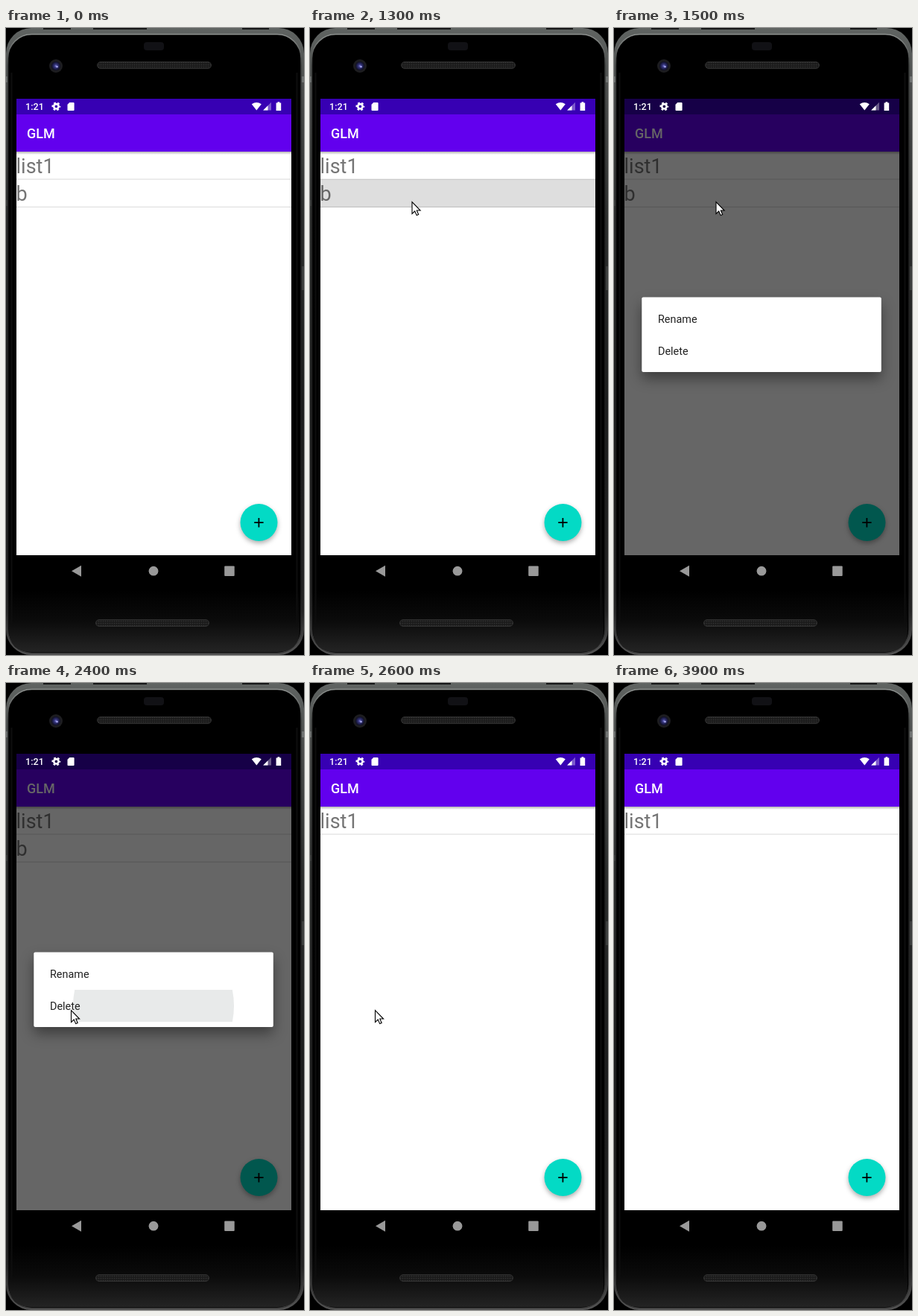
These frames come from a looping animation (400 by 842 pixels, 4 s). An HTML page:

```html
<!DOCTYPE html>
<html lang="en">
<head>
<meta charset="utf-8">
<title>List app</title>
<style>
  html, body { margin: 0; width: 100%; height: 100%; overflow: hidden; background: #000; }
  svg { display: block; width: 100vw; height: 100vh; }
  text { font-family: Roboto, sans-serif; }
  #fab { filter: drop-shadow(0 3px 3px rgba(0,0,0,.32)); }
  #panel { filter: drop-shadow(0 9px 9px rgba(0,0,0,.4)); }
</style>
</head>
<body>
<svg viewBox="0 0 400 842" xmlns="http://www.w3.org/2000/svg">
  <defs>
    <linearGradient id="rim" x1="0" y1="0" x2="0" y2="1">
      <stop offset="0" stop-color="#606462"/>
      <stop offset=".1" stop-color="#4a4c4b"/>
      <stop offset=".3" stop-color="#2c2e2d"/>
      <stop offset=".6" stop-color="#1c1d1d"/>
      <stop offset=".93" stop-color="#242424"/>
      <stop offset="1" stop-color="#555"/>
    </linearGradient>
    <linearGradient id="edge" x1="0" y1="0" x2="0" y2="1">
      <stop offset="0" stop-color="#8d918f"/>
      <stop offset=".05" stop-color="#3a3c3b"/>
      <stop offset=".3" stop-color="#222"/>
      <stop offset=".9" stop-color="#1c1c1c"/>
      <stop offset="1" stop-color="#3c3c3c"/>
    </linearGradient>
    <linearGradient id="chin" x1="0" y1="0" x2="0" y2="1">
      <stop offset="0" stop-color="#000"/>
      <stop offset=".5" stop-color="#0b0b0b"/>
      <stop offset="1" stop-color="#242424"/>
    </linearGradient>
    <linearGradient id="barShade" x1="0" y1="0" x2="0" y2="1">
      <stop offset="0" stop-color="#000" stop-opacity=".3"/>
      <stop offset="1" stop-color="#000" stop-opacity="0"/>
    </linearGradient>
    <radialGradient id="lens">
      <stop offset="0" stop-color="#7f7fd8"/>
      <stop offset=".35" stop-color="#35357c"/>
      <stop offset="1" stop-color="#0c0c20"/>
    </radialGradient>
    <pattern id="mesh" width="3" height="3" patternUnits="userSpaceOnUse">
      <rect width="3" height="3" fill="#1b1b1b"/>
      <circle cx="1.5" cy="1.5" r=".8" fill="#343434"/>
    </pattern>
    <clipPath id="rowClip"><rect x="14" y="203" width="369" height="38"/></clipPath>
    <clipPath id="itemClip"><rect x="37" y="412" width="322" height="43"/></clipPath>
  </defs>

  <!-- phone body -->
  <rect width="400" height="842" fill="#000"/>
  <rect x="0" y="0" width="400" height="842" rx="34" fill="url(#rim)"/>
  <g fill="#151616">
    <rect x="50" width="37" height="2"/>
    <rect x="117" width="72" height="2"/>
    <rect x="317" width="36" height="2"/>
  </g>
  <g fill="#707372">
    <rect x="0" y="65" width="3" height="8"/>
    <rect x="397" y="65" width="3" height="8"/>
    <rect x="0" y="231" width="3" height="8" fill="#3c3e3d"/>
    <rect x="397" y="320" width="3" height="32" fill="#3c3e3d"/>
  </g>
  <rect x="2.5" y="8.5" width="393.5" height="831" rx="32" fill="#000" stroke="url(#edge)" stroke-width="1.5"/>
  <path d="M4 755H394V808Q394 838 364 838H34Q4 838 4 808Z" fill="url(#chin)"/>
  <path d="M7.5 60V800M390.5 60V800" stroke="#0e0e0e" stroke-width="2"/>

  <rect x="185" y="19" width="27" height="11" rx="4" fill="#111115"/>
  <circle cx="67" cy="51" r="9" fill="#1d1d20"/>
  <circle cx="67" cy="51" r="6" fill="url(#lens)"/>
  <circle cx="68.5" cy="52" r="1.3" fill="#a9a9ee"/>
  <g fill="url(#mesh)" stroke="#303030">
    <rect x="122.5" y="45.5" width="153" height="9" rx="4.5"/>
    <rect x="120.5" y="794.5" width="152" height="9" rx="4.5"/>
  </g>

  <!-- app -->
  <rect x="14" y="95" width="369" height="613" fill="#fff"/>
  <rect x="14" y="95" width="369" height="21" fill="#3700b3"/>
  <rect x="14" y="116" width="369" height="50" fill="#6200ee"/>
  <rect x="14" y="166" width="369" height="4" fill="url(#barShade)"/>
  <text x="28" y="148" font-size="18" font-weight="500" fill="#fff">GLM</text>
  <g font-size="27" fill="#757575">
    <text x="13.5" y="195">list1</text>
    <rect x="14" y="202.5" width="369" height="1.2" fill="#e0e0e0"/>
    <g id="rowB">
      <text x="13.5" y="232">b</text>
      <rect x="14" y="239.8" width="369" height="1.2" fill="#e0e0e0"/>
    </g>
  </g>
  <g clip-path="url(#rowClip)"><circle id="press" fill="#000"/></g>
  <g id="fab">
    <circle cx="339.5" cy="664" r="25" fill="#03dac5"/>
    <path d="M333.2 664.2H345.6M339.4 658V670.4" stroke="#000" stroke-width="1.8"/>
  </g>
  <rect id="dim" x="14" y="95" width="369" height="613" fill="#000"/>

  <!-- status bar icons -->
  <g fill="#fff">
    <text x="26" y="110.2" font-size="12.6" font-weight="500">1:21</text>
    <circle cx="67.4" cy="105.3" r="3.2" fill="none" stroke="#fff" stroke-width="2.6"/>
    <circle cx="67.4" cy="105.3" r="5" fill="none" stroke="#fff" stroke-width="1.9" stroke-dasharray="2.7 2.536" stroke-dashoffset="1.35"/>
    <path d="M85.3 100H90.5Q91.6 100 91.6 101.1V109.9Q91.6 111 90.5 111H83.6Q82.5 111 82.5 109.9V102.8Z"/>
    <path d="M329.8 102.3Q336.3 97.6 342.8 102.3L336.3 110.5Z"/>
    <path d="M345.2 110.5L356 99.7V110.5Z" opacity=".35"/>
    <path d="M345.2 110.5L351.5 104.2V110.5Z"/>
    <path d="M362.6 100.6H364.5V99.3H367.3V100.6H369.2V111H362.6Z"/>
  </g>

  <!-- navigation -->
  <g fill="#999">
    <path d="M88 729.3L101 721.8V736.8Z"/>
    <circle cx="198" cy="729.2" r="6.4"/>
    <rect x="293.2" y="722.5" width="13.5" height="13.5" rx="1"/>
  </g>

  <g id="menu">
    <rect id="panel" x="37.3" y="361.5" width="321.5" height="100.5" rx="2" fill="#fff"/>
    <g clip-path="url(#itemClip)"><circle id="tap" cx="198" cy="433.5" r="108" fill="#e8eaea"/></g>
    <g font-size="14.4" fill="#212121">
      <text x="59" y="396">Rename</text>
      <text x="59" y="439">Delete</text>
    </g>
  </g>

  <path id="arrow" d="M.5 .5V16.5L4.2 13L6.7 18.6L9.2 17.5L6.8 12H11.6Z" fill="#fff" stroke="#000" stroke-width="1.1"/>
</svg>
<script>
const LOOP = 4000, STEP = 100;
const el = id => document.getElementById(id);
const rowB = el('rowB'), press = el('press'), dim = el('dim'), menu = el('menu'), tap = el('tap'), arrow = el('arrow');

const clamp = v => Math.min(1, Math.max(0, v));
const part = (t, a, b) => clamp((t - a) / (b - a));
const mix = (a, b, k) => a + (b - a) * k;
const smooth = k => k * k * (3 - 2 * k);
const set = (node, attrs) => { for (const k in attrs) node.setAttribute(k, attrs[k]); };
const show = (node, on) => set(node, { visibility: on ? 'visible' : 'hidden' });

// pointer stops: time, x, y
const entry = [[100, 388, 796], [200, 295, 620], [300, 194, 447], [400, 128, 318], [500, 122, 252], [600, 136.5, 233]];

function pointer(t) {
  if (t < 600) {
    const i = Math.max(0, Math.floor(t / 100) - 1);
    const [t0, x0, y0] = entry[i], [t1, x1, y1] = entry[i + 1];
    const k = part(t, t0, t1);
    return [mix(x0, x1, k), mix(y0, y1, k)];
  }
  if (t < 3000) {
    const k = smooth(part(t, 1500, 2200));
    return [mix(136.5, 87, k), mix(233, 439, k)];
  }
  const k = part(t, 3000, 3400) ** 2;
  return [mix(87, 303, k), mix(439, 456, k)];
}

function draw(t) {
  const [x, y] = pointer(t);
  set(arrow, { transform: `translate(${x} ${y})` });
  show(arrow, t >= 100 && t < 3500);

  // long press on the second row
  const grow = smooth(part(t, 700, 1050));
  set(press, {
    cx: mix(137, 198.5, grow), cy: mix(233, 222, grow), r: mix(20, 190, grow),
    opacity: .13 * part(t, 700, 850) * (1 - part(t, 1300, 1500))
  });
  show(press, t >= 800 && t < 1500);
  show(rowB, t < 2500);

  // context menu
  const open = part(t, 1300, 1500) * (1 - part(t, 2400, 2600));
  const size = t < 2000 ? mix(.94, 1, open) : 1;
  set(dim, { opacity: .6 * open });
  set(menu, {
    opacity: open,
    transform: `translate(198 411.7) scale(${size}) translate(-198 -411.7)`
  });
  set(tap, { r: mix(108, 165, part(t, 2400, 2500)), opacity: t >= 2400 ? 1 : 0 });
}

function tick() {
  const t = performance.now() % LOOP;
  draw(Math.floor(t / STEP) * STEP);
  requestAnimationFrame(tick);
}
tick();
</script>
</body>
</html>
```
